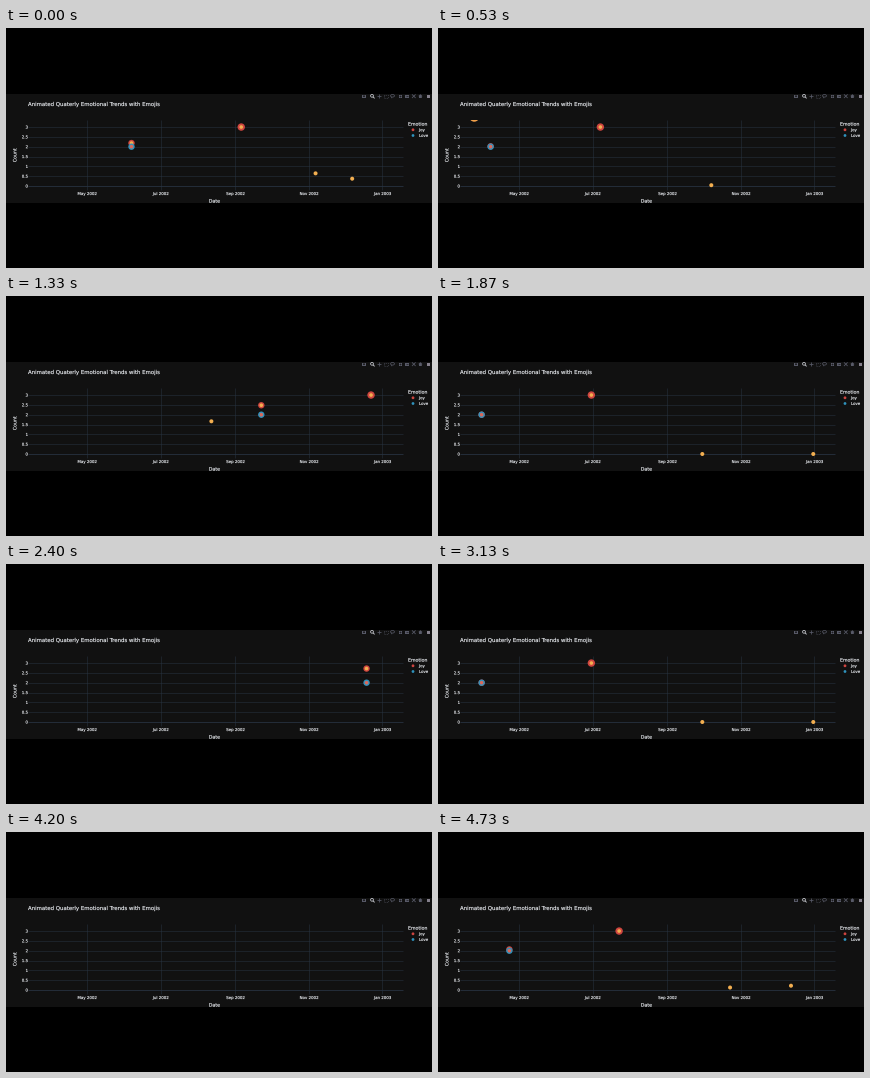
A matplotlib script that plays this animation: 426 px wide and 240 px high, repeating every 4.79 s.

```python
import numpy as np
import matplotlib.pyplot as plt
from matplotlib.animation import FuncAnimation
from matplotlib.patches import Circle, Ellipse, PathPatch, Polygon, Rectangle
from matplotlib.textpath import TextPath
from matplotlib.transforms import Affine2D

W, H, DPI = 426, 240, 64
PT = 72 / DPI
LOOP, STEPS, SUB = 4790, 72, 3
FRAMES = STEPS * SUB

PANEL, GRID, INK = "#111111", "#283442", "#f2f5fa"
JOY, LOVE = "#cf4540", "#2f93bd"
FACE, HEART = "#f2ae50", "#d9685a"
IDLE, ACTIVE = "#585a68", "#c4c6cc"

LEFT, RIGHT, TOP, BOTTOM = 22, 397, 91.8, 162
MAY, DAY = 81, 1.206
YEAR = 365 * DAY

# Start of each move to the next year, start of the move back
TRIPS = [(522, 1071), (2035, 2590), (3660, 4255)]
MOVE = 500

plt.rcParams["font.family"] = "DejaVu Sans"
fig = plt.figure(figsize=(W / DPI, H / DPI), dpi=DPI, facecolor="black")
ax = fig.add_axes([0, 0, 1, 1])
ax.set_xlim(0, W)
ax.set_ylim(H, 0)
ax.axis("off")


def date_x(days):
    """Pixel column for a number of days after 1 May 2002."""
    return MAY + days * DAY


def count_y(count):
    return 158 - 19.65 * count


def label(x, y, text, size, align=0, angle=0):
    """Text as outlines on baseline y; align 0 left, 0.5 centre, 1 right."""
    path = TextPath((0, 0), text, size=size)
    place = (Affine2D().translate(-align * path.get_extents().x1, 0)
             .scale(1, -1).rotate_deg(-angle).translate(x, y))
    ax.add_patch(PathPatch(path, fc=INK, ec=INK, lw=0.12 * PT,
                           transform=place + ax.transData))


def line(xs, ys, color, width):
    ax.plot(xs, ys, color=color, lw=width * PT, solid_capstyle="butt")


def draw_chart():
    ax.add_patch(Rectangle((0, 65.7), W, 109.6, fc=PANEL, lw=0))
    label(22, 78, "Animated Quaterly Emotional Trends with Emojis", 5.4)
    for i in range(7):
        y = count_y(i / 2)
        line([LEFT, RIGHT], [y, y], GRID, 0.5 if i else 0.8)
        label(21.7, y + 1.5, f"{i / 2:g}", 3.95, 1)
    months = ["May 2002", "Jul 2002", "Sep 2002", "Nov 2002", "Jan 2003"]
    for days, name in zip([0, 61, 123, 184, 245], months):
        x = date_x(days)
        line([x, x], [TOP, BOTTOM], GRID, 0.5)
        label(x, 167, name, 3.95, 0.5)
    label(208.3, 174.6, "Date", 4.7, 0.5)
    label(10.4, 127.3, "Count", 4.7, 0.5, angle=90)


def draw_legend():
    label(402, 97.6, "Emotion", 4.7)
    for y, name, color in [(101.8, "Joy", JOY), (107.5, "Love", LOVE)]:
        ax.add_patch(Circle((407, y), 1.4, fc=color, lw=0))
        label(413, y + 1.4, name, 3.9)


def draw_toolbar():
    y = 68.2

    def box(x, **kw):
        ax.add_patch(Rectangle((x - 1.8, y - 1.6), 3.6, 3.2, **kw))

    def outline(**kw):
        return dict(fc="none", ec=IDLE, lw=0.7 * PT, **kw)

    box(358, fc=IDLE, lw=0)
    ax.add_patch(Circle((358, y), 0.9, fc=PANEL, lw=0))
    ax.add_patch(Circle((366, y - 0.4), 1.4, fc="none", ec=ACTIVE, lw=0.8 * PT))
    line([367, 368.6], [y + 0.6, y + 2.2], ACTIVE, 0.9)
    line([371.2, 375.2], [y, y], IDLE, 0.8)
    line([373.2, 373.2], [y - 2, y + 2], IDLE, 0.8)
    box(380, **outline(ls=":"))
    ax.add_patch(Ellipse((386.5, y - 0.4), 3.8, 2.6, **outline()))
    line([385.4, 386], [y + 0.8, y + 2], IDLE, 0.7)
    for x in (394.3, 401.2):
        box(x, fc=IDLE, lw=0)
        line([x - 1, x + 1], [y, y], PANEL, 0.6)
    line([394.3, 394.3], [y - 1, y + 1], PANEL, 0.6)
    for d in (-1, 1):
        line([406, 409.6], [y - 1.8 * d, y + 1.8 * d], IDLE, 0.8)
    house = [(412.2, y), (414.4, y - 2), (416.6, y), (415.8, y), (415.8, y + 1.8),
             (413, y + 1.8), (413, y)]
    ax.add_patch(Polygon(house, fc=IDLE, lw=0))
    ax.add_patch(Rectangle((421, y - 1.5), 3.2, 3.2, fc="#85808c", lw=0))


plot_area = Rectangle((LEFT, TOP), RIGHT - LEFT, BOTTOM - TOP,
                      transform=ax.transData)


class Dot:
    """A marker with an emoji on top, moving from start to end."""

    def __init__(self, start, end, discs):
        self.start, self.end = np.array(start), np.array(end)
        self.discs = [Circle(start, r, fc=c, lw=0, zorder=5) for r, c in discs]
        for disc in self.discs:
            ax.add_patch(disc)
            disc.set_clip_path(plot_area)

    def place(self, part, shown=True):
        for disc in self.discs:
            disc.set_center(self.start + (self.end - self.start) * part)
            disc.set_visible(shown)


def quarter_dot(days, before, after, discs):
    x = date_x(days)
    return Dot((x, count_y(before)), (x + YEAR, count_y(after)), discs)


draw_chart()
draw_legend()
draw_toolbar()

face = [(2.0, FACE)]
dots = [
    quarter_dot(-31, 2, 3, [(3.2, JOY), (1.8, FACE)]),
    quarter_dot(60, 3, 3, [(3.7, JOY), (1.8, FACE)]),
    quarter_dot(152, 0, 2, face),
    quarter_dot(-31, 2, 2, [(3.2, LOVE), (1.8, HEART)]),
]
# New points fly in from the corner of the plot
last = Dot((date_x(244), count_y(0)), (22, 90), face)
newcomer = Dot((20, 88.5), (date_x(244) + YEAR, count_y(3)), [(5, "#f2a04a")])

keys, parts = [0, 93], [0.186, 0]
for out, back in TRIPS:
    keys += [out, out + MOVE, back, back + MOVE]
    parts += [0, 1, 1, 0]


def update(i):
    # The picture advances in even steps, each held for SUB frames
    step = (i + 1) // SUB % STEPS
    t = step * LOOP / STEPS
    part = np.interp(t, keys, parts)
    away = any(out <= t < back for out, back in TRIPS)
    for dot in dots:
        dot.place(part)
    last.place(part, not away)
    newcomer.place(part, away)
    return []


anim = FuncAnimation(fig, update, frames=FRAMES, interval=LOOP / FRAMES,
                     init_func=lambda: [], repeat=True, repeat_delay=0)
plt.show()
```
